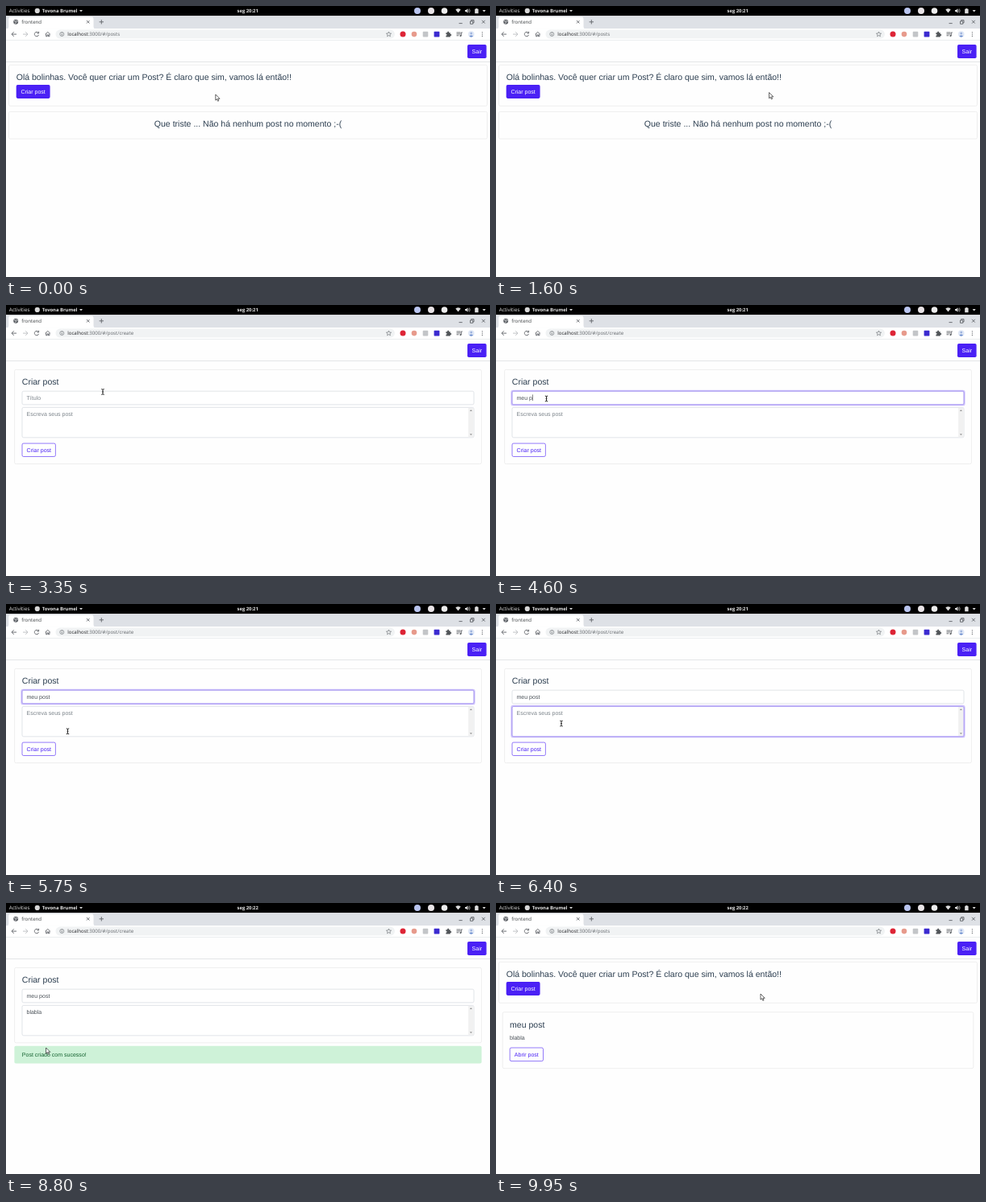
Write an HTML page that moves like this. It is 600 px wide and 337 px high and loops after 10 s.

```html
<!DOCTYPE html>
<html lang="pt">
<head>
<meta charset="utf-8">
<title>Criar post</title>
<style>
html, body { margin: 0; width: 100%; height: 100%; overflow: hidden; background: #fefefe; }
svg { display: block; width: 100vw; height: 100vh; }
text { font: 7.03px "Liberation Sans", Arial, sans-serif; fill: #495057; text-rendering: geometricPrecision; white-space: pre; }
.ui { font: 6.1px "Open Sans", sans-serif; fill: #3c4043; }
.bar { font: 6.25px "Open Sans", sans-serif; fill: #e6e6e6; }
.bold { font-size: 5.85px; font-weight: 700; }
.h { font-size: 10.54px; fill: #2c3e50; }
.mid { text-anchor: middle; }
.w { fill: #fff; }
.p { fill: #4a20f5; }
.card { fill: #fefefe; stroke: #dfdfdf; stroke-width: .5; }
.field { fill: #fff; stroke: #ced4da; stroke-width: .6; }
.outline { fill: #fefefe; stroke: #4a20f5; stroke-width: .6; }
.line { fill: none; stroke: #5f6368; stroke-width: .9; }
.glow { fill: none; stroke: #4a20f5; stroke-opacity: .27; stroke-width: 1.5; }
.focus { fill: none; stroke: #9d86fb; stroke-width: .7; }
</style>
</head>
<body>
<svg id="stage" viewBox="0 0 600 337" preserveAspectRatio="none"></svg>
<script>
const LOOP = 10000, STEP = 50;
const text = (x, y, s, cls = '', id = '') => `<text x="${x}" y="${y}" class="${cls}" id="${id}">${s}</text>`;
const rect = (x, y, w, h, attr = '', r = 1.8) => `<rect x="${x}" y="${y}" width="${w}" height="${h}" rx="${r}" ${attr}/>`;
const box = (x, y, w, h, cls, id = '') => rect(x, y, w, h, `class="${cls}" id="${id}"`);
const dot = (x, y, r, fill) => `<circle cx="${x}" cy="${y}" r="${r}" fill="${fill}"/>`;
const path = (d, attr = 'class="line"') => `<path d="${d}" ${attr}/>`;
const group = (id, ...parts) => `<g id="${id}">${parts.join('')}</g>`;
const ring = (id, x, y, w, h) => group(id,
  box(x - .8, y - .8, w + 1.6, h + 1.6, 'glow'), box(x, y, w, h, 'focus'));

const topBar = group('top',
  rect(0, 0, 600, 12.3, 'fill="#000"', 0),
  text(3.7, 8.1, 'Activities', 'bar'),
  dot(38.8, 5.9, 3.1, '#d8d8d8'),
  text(44.7, 8.1, 'Tovona Brumel', 'bar bold'),
  path('M91 4.9h4l-2 2.4z', 'fill="#ddd"'),
  text(299.7, 8.1, '', 'bar bold mid', 'clock'),
  dot(510, 6, 4, '#b9c4ee'), dot(527, 6, 4, '#e8e3e6'), dot(543.5, 6, 3.8, '#ececec'),
  path('M557.3 4.6q3.2-2.6 6.4 0l-3.2 4z', 'fill="#ddd"'),
  path('M569 5h1.4l2-1.8v5.6l-2-1.8h-1.4z', 'fill="#ddd"'),
  path('M573.3 4.4q1.2 1.6 0 3.2M574.3 3.4q2 2.6 0 5.2', 'fill="none" stroke="#ddd" stroke-width=".6"'),
  path('M581.2 3.8h1.2v-.8h2v.8h1.2v5.4h-4.4z', 'fill="#ddd"'),
  path('M590.7 5h4l-2 2.4z', 'fill="#ddd"'));

const tabs = group('tabs',
  rect(0, 12.3, 600, 16, 'fill="#dee1e6"', 0),
  path('M1 28.3q2.3 0 2.3-2.4V16q0-2.4 2.4-2.4h100.4q2.4 0 2.4 2.4v9.9q0 2.4 2.4 2.4z', 'fill="#fff"'),
  dot(12.2, 19.8, 3, '#5f6368'),
  path('M10.2 18.4l1.8.6.4 1.4-1 1.4M13 17.6l.4 1.2 1.4.5', 'fill="none" stroke="#fff" stroke-width=".7"'),
  text(19.2, 21.9, 'frontend', 'ui'),
  path('M100 18l3.5 3.5M103.5 18l-3.5 3.5M118.3 17.1v5.4M115.6 19.8h5.4'),
  path('M561.5 21.6h4.2M575.5 19h3.3v3.3h-3.3zM576.6 18.8v-1.2h3.4v3.4h-1M590 17.8l3.8 3.8M593.8 17.8l-3.8 3.8'));

const toolbar = group('toolbar',
  rect(0, 28.2, 600, 14, 'fill="#fff"', 0),
  path('M13 35.1H7.2M9.8 32.3L7 35.1l2.8 2.8'),
  path('M21 35.1h5.8M24.2 32.3l2.8 2.8-2.8 2.8', 'fill="none" stroke="#b9bcc0" stroke-width=".9"'),
  path('M40.1 33.3a2.7 2.7 0 1 0 .5 2.6M40.6 31.8v2.2h-2.2'),
  path('M48.8 35.2l3-2.8 3 2.8M49.7 34.8v3h1.4v-1.9h1.4v1.9h1.4v-3'),
  rect(61.5, 29.6, 420.5, 11, 'fill="#f1f3f4"', 5.5),
  '<circle cx="69.3" cy="35" r="2.5" class="line" style="stroke-width:.6"/>',
  path('M69.3 34.7v1.7M69.3 33.4v.6'),
  `<text x="76.2" y="37.2" class="ui"><tspan fill="#202124">localhost</tspan><tspan id="url" fill="#5f6368"></tspan></text>`,
  path('M474.5 32l.9 2 2.2.2-1.7 1.4.5 2.2-1.9-1.2-1.9 1.2.5-2.2-1.7-1.4 2.2-.2z', 'class="line" style="stroke-width:.6"'),
  dot(492, 35.1, 3.5, '#dd2436'), dot(506, 35.1, 3.3, '#e79a8c'),
  rect(516.7, 31.8, 6.6, 6.6, 'fill="#c3c5c8"', 1), rect(530.6, 31.8, 6.8, 6.6, 'fill="#3b2bd0"', .6),
  path('M545.4 33.2h1.7q-.1-1.6 1-1.6t1 1.6h1.7v1.8q1.5-.1 1.5 1t-1.5 1v1.6h-5.4v-1.9q1.3 0 1.3-.9t-1.3-.9z', 'fill="#505458"'),
  path('M558.5 33h5M558.5 34.9h5M558.5 36.8h2.8M564.3 37V33h1.6'),
  dot(563.5, 37.1, 1.1, '#5f6368'),
  dot(576.7, 35.1, 3.8, '#dfe7f5'),
  path('M574.3 37.8q2.4-2.6 4.8 0l-2.4 1z', 'fill="#6d8fd0"'), dot(576.7, 34.1, 1.3, '#9cb2dc'),
  [32.8, 35.1, 37.4].map(y => dot(590.4, y, .65, '#5f6368')).join(''),
  rect(0, 42.2, 600, .5, 'fill="#d7dade"', 0));

const nav = group('nav',
  rect(0, 69.2, 600, .6, 'fill="#d3d6d9"', 0),
  box(572, 48, 23.6, 17, 'p'),
  text(583.8, 59, 'Sair', 'w mid'));

const posts = group('posts',
  box(3.5, 73.3, 593, 51, 'card'),
  text(12.7, 92.3, 'Olá bolinhas. Você quer criar um Post? É claro que sim, vamos lá então!!', 'h'),
  box(12.7, 98.1, 41.9, 16.8, 'p', 'newBtn'),
  ring('newRing', 12.7, 98.1, 41.9, 16.8),
  text(18.4, 109, 'Criar post', 'w'),
  group('empty',
    box(3.5, 131.4, 593, 33.8, 'card'),
    text(300, 150.3, 'Que triste ... Não há nenhum post no momento ;-(', 'h mid')),
  group('made',
    box(8.2, 135.7, 583.6, 70, 'card'),
    text(17, 154.7, 'meu post', 'h'),
    text(17, 170, 'blabla'),
    box(17.2, 180, 41.3, 16.6, 'outline'),
    text(22.8, 190.6, 'Abrir post', 'p')));

const create = group('create',
  box(10.6, 80.4, 578.8, 117.2, 'card', 'formCard'),
  text(19.8, 99.3, 'Criar post', 'h'),
  box(20, 107.2, 560, 16.6, 'field'),
  ring('titleRing', 20, 107.2, 560, 16.6),
  text(25.5, 117.8, '', '', 'title'),
  box(20, 127.4, 560, 37.4, 'field'),
  rect(573.2, 127.9, 6.3, 36.4, 'fill="#f1f1f1"', 0),
  path('M574.9 132h3l-1.5-1.8zM574.9 160.2h3l-1.5 1.8z', 'fill="#8f8f8f"'),
  ring('bodyRing', 20, 127.4, 560, 37.4),
  text(25.5, 138, '', '', 'body'),
  rect(0, 0, .6, 7.6, 'id="caret" fill="#333"', 0),
  group('send',
    ring('sendRing', 20, 172.1, 41.4, 16.4),
    box(20, 172.1, 41.4, 16.4, 'outline', 'sendBtn'),
    text(25.6, 182.8, 'Criar post', '', 'sendText')),
  group('done',
    box(10.4, 177.8, 579.2, 21.8, '" fill="#cef2d8'),
    text(19.8, 191, 'Post criado com sucesso!', '" style="fill:#14622f')));

const ink = 'stroke="#222" stroke-width=".7" stroke-linejoin="round" fill="#fff"';
const pointers = group('pointer',
  group('arrow', path('M0 0v7.2l1.7-1.5 1.1 2.6 1.2-.5-1.1-2.5h2.3z', ink)),
  group('hand', path('M-.6 0q.7-.6 1.2 0v2.7l3 .6q1 .3.9 1.3l-.6 3H.2L-2.3 4.7q0-.9.8-.7l.9.7z', ink)),
  group('beam', path('M-1.7-3.4q1.7 0 1.7.8 0-.8 1.7-.8M0-2.6v5.2M-1.7 3.4q1.7 0 1.7-.8 0 .8 1.7.8M-.8 0h1.6',
    'fill="none" stroke="#222" stroke-width="1"')));

document.getElementById('stage').innerHTML =
  topBar + tabs + toolbar + nav + posts + create + pointers;

const $ = Object.fromEntries([...document.querySelectorAll('[id]')].filter(e => e.id).map(e => [e.id, e]));
const show = (id, on) => { $[id].style.display = on ? '' : 'none'; };

// time, x, y, pointer shape
const moves = [
  [0, 259.8, 110, 'arrow'], [150, 259.8, 110, 'arrow'], [250, 260.2, 111, 'arrow'], [1000, 260.2, 111, 'arrow'],
  [1300, 497, 124, 'arrow'], [1450, 480, 126, 'arrow'], [1800, 150, 83, 'arrow'], [2050, 3, 106, 'arrow'],
  [2100, 3, 106, 'arrow'], [2300, 15, 103, 'hand'], [2450, 28, 106.2, 'hand'], [2700, 28, 106.2, 'hand'],
  [2750, 28, 111, 'beam'], [2900, 28, 111, 'beam'], [3000, 180, 174, 'arrow'], [3200, 589, 50, 'arrow'],
  [3350, 120, 108, 'beam'], [3450, 62.5, 116.5, 'beam'], [5300, 62.5, 116.5, 'beam'],
  [5600, 72, 168, 'beam'], [5900, 81, 148.6, 'beam'], [8200, 81, 148.6, 'beam'],
  [8350, 62, 172, 'arrow'], [8400, 53, 177, 'hand'], [8550, 53, 177, 'hand'], [8700, 50, 179, 'hand'],
  [8750, 49.6, 180, 'arrow'], [8800, 49.6, 180, 'arrow'], [8850, 48, 180.5, 'arrow'], [9100, 48, 180.5, 'arrow'],
  [9350, 58, 183, 'arrow'], [9700, 58, 183, 'arrow'], [9950, 328, 113, 'arrow'], [LOOP, 328, 113, 'arrow']
];
const titleKeys = [4050, 4250, 4400, 4450, 4600, 4800, 4950, 5050];
const bodyKeys = [6850, 7000, 7200, 7400, 7550, 7650];

const within = (t, a, b) => t >= a && t < b;
const typed = (s, keys, t) => s.slice(0, keys.filter(k => k <= t).length);

function fill(id, value, hint) {
  $[id].textContent = value || hint;
  $[id].style.fill = value ? '' : '#7b838a';
  return value ? $[id].getComputedTextLength() : 0;
}

function movePointer(t) {
  const i = moves.findIndex(m => m[0] > t);
  const [t0, x0, y0, kind] = moves[i - 1], [t1, x1, y1] = moves[i];
  const k = (t - t0) / (t1 - t0);
  $.pointer.setAttribute('transform', `translate(${x0 + (x1 - x0) * k} ${y0 + (y1 - y0) * k})`);
  for (const p of ['arrow', 'hand', 'beam']) show(p, p === kind);
}

function draw(t) {
  const form = within(t, 2650, 9750), sent = t >= 8750;
  $.clock.textContent = t < 7200 ? 'seg 20:21' : 'seg 20:22';
  $.url.textContent = ':3000/#/' + (form ? 'post/create' : 'posts');
  show('posts', !form);
  show('create', form);
  show('empty', t < 2650);
  show('made', t >= 9750);
  show('newRing', within(t, 2600, 2650));
  $.newBtn.style.fill = within(t, 2300, 2650) ? '#3a12d2' : '';

  if (form) {
    const onTitle = within(t, 3450, 5900), onBody = within(t, 5900, 8650);
    const titleEnd = fill('title', typed('meu post', titleKeys, t), 'Título');
    const bodyEnd = fill('body', typed('blabla', bodyKeys, t), 'Escreva seus post');
    show('titleRing', onTitle);
    show('bodyRing', onBody);
    show('caret', within(t, 3450, 3950) || within(t, 4050, 5550) || within(t, 5900, 6400) || within(t, 6850, 8250));
    $.caret.setAttribute('x', 25.5 + (onTitle ? titleEnd : bodyEnd));
    $.caret.setAttribute('y', onTitle ? 111.4 : 131.7);

    const fading = within(t, 8450, 8550), solid = t >= 8550;
    $.sendBtn.style.fill = solid ? '#4a20f5' : fading ? '#c8bdf7' : '';
    $.sendText.style.fill = solid ? '#fff' : fading ? '#8468ee' : '#4a20f5';
    show('sendRing', t >= 8650);
    show('send', !sent);
    show('done', sent);
    $.formCard.setAttribute('height', sent ? 93.4 : 117.2);
  }
  movePointer(t);
}

const start = performance.now();
function tick() {
  const t = (performance.now() - start) % LOOP;
  draw(Math.floor(t / STEP) * STEP);
  requestAnimationFrame(tick);
}
tick();
</script>
</body>
</html>
```
